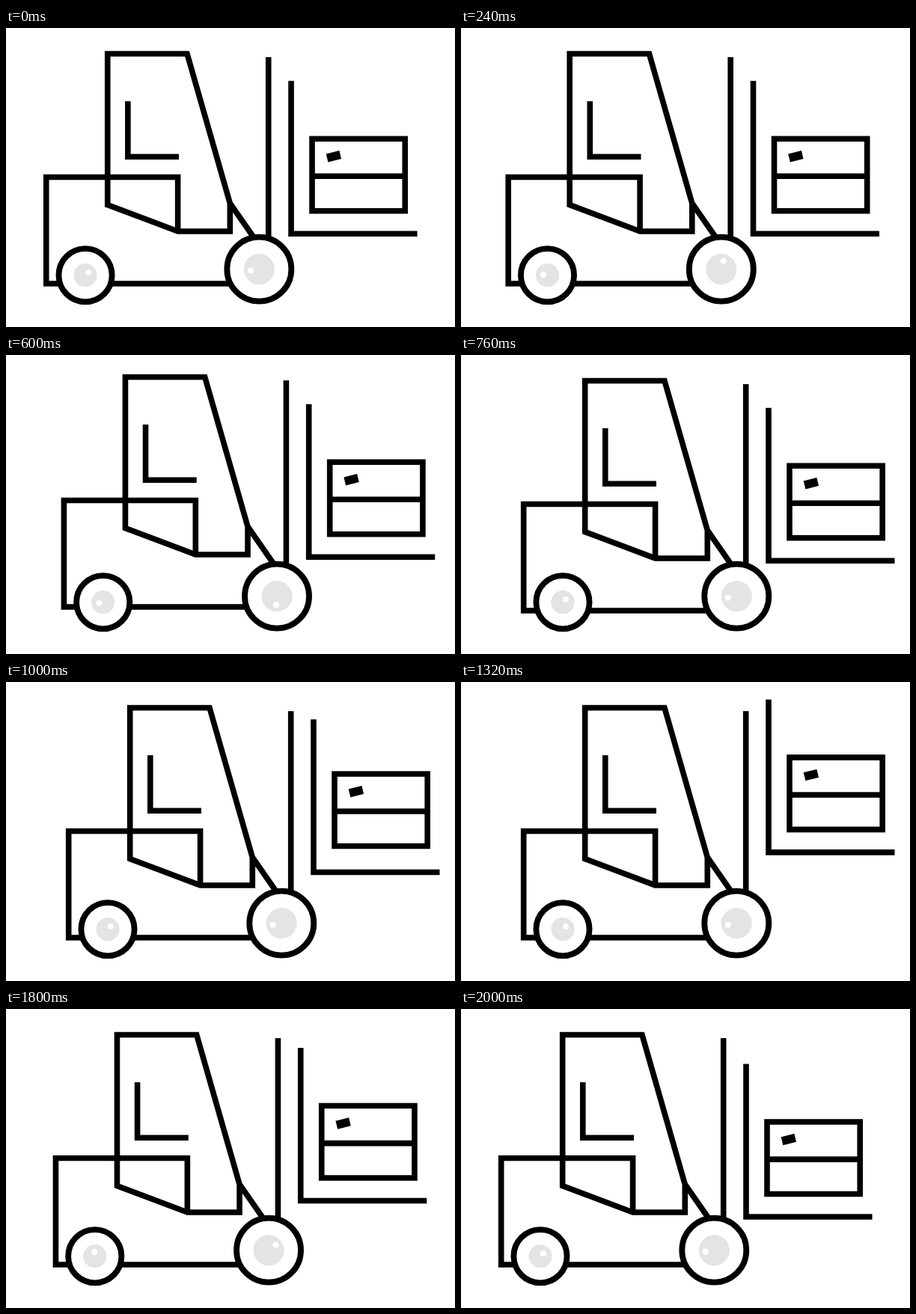
An HTML page for the animation above (2040 ms loop, 600 px wide and 400 px high).

```html
<!DOCTYPE html>
<html lang="en">
<head>
<meta charset="utf-8">
<title>Forklift</title>
<style>
  html, body { margin: 0; width: 100%; height: 100%; overflow: hidden; background: #fff; }
  svg { display: block; width: 600px; height: 400px; }
  .line { fill: none; stroke: #000; stroke-width: 7.6; stroke-miterlimit: 10; }
  .tyre { fill: #fff; stroke: #000; stroke-width: 7.8; }
  .hub { fill: #e4e4e4; }
  .dot { fill: #fff; }
</style>
</head>
<body>
<svg viewBox="0 0 600 400">
  <g id="truck">
    <g id="body">
      <g class="line">
        <path d="M305 342H53.7V199.5H229.6V272"/>
        <path d="M299.3 234.5V272H229.6L135.7 236.5V34.5H242L299.3 234.5L333 283"/>
        <path d="M162.8 98V172.2H231"/>
        <path d="M350.7 39V290"/>
        <path id="fork" d="M381 70.8V275.2H549.5"/>
      </g>
      <g id="box">
        <path class="line" d="M409 148.2H533.2V244.7H409ZM409 198.3H533.2"/>
        <path d="M427.7 168.4L445.4 164L448 175L430.4 179.4Z"/>
      </g>
    </g>
    <g transform="translate(106 330.7)">
      <circle class="tyre" r="35.6"/>
      <circle class="hub" r="15.6"/>
      <circle class="dot" id="rearDot" cx="4" cy="-3.6" r="4"/>
    </g>
    <g transform="translate(338.3 322.7)">
      <circle class="tyre" r="43"/>
      <circle class="hub" r="20.6"/>
      <circle class="dot" id="frontDot" cx="-11.6" cy="2" r="4"/>
    </g>
  </g>
</svg>
<script>
  const LOOP = 2040, TRAVEL = 30, LIFT = -51.4;
  const part = id => document.getElementById(id);
  const [truck, body, fork, box, rearDot, frontDot] =
    ['truck', 'body', 'fork', 'box', 'rearDot', 'frontDot'].map(part);

  const progress = (t, start, end) => Math.min(1, Math.max(0, (t - start) / (end - start)));
  const move = (el, x, y) => el.setAttribute('transform', `translate(${x} ${y})`);
  const spin = (el, turns) => el.setAttribute('transform', `rotate(${turns * 360})`);

  // Damped swing that follows an abrupt stop
  function swing(t, stop) {
    const s = (t - stop) / 1000;
    return s > 0 ? 11.6 * Math.sin(8 * Math.PI * s) * Math.exp(-5 * s) : 0;
  }

  function lift(t, power) {
    if (t < 1640) return LIFT * progress(t, 894, 1160) ** power - swing(t, 1160);
    return LIFT * (1 - progress(t, 1640, 1893)) + swing(t, 1893);
  }

  function draw(t) {
    const drive = progress(t, 0, 760) - progress(t, 1640, 1920);
    const jounce = t < 720 ? -2.5 * (1 - Math.cos(2 * Math.PI * t / 240)) : 0;
    move(truck, TRAVEL * drive, 0);
    move(body, 0, jounce);
    move(fork, 0, lift(t, 1));
    move(box, 0, lift(t, 0.78));
    spin(frontDot, drive);
    spin(rearDot, 2 * drive);
  }

  const began = performance.now();
  function frame() {
    draw((performance.now() - began) % LOOP);
    requestAnimationFrame(frame);
  }
  frame();
</script>
</body>
</html>
```
